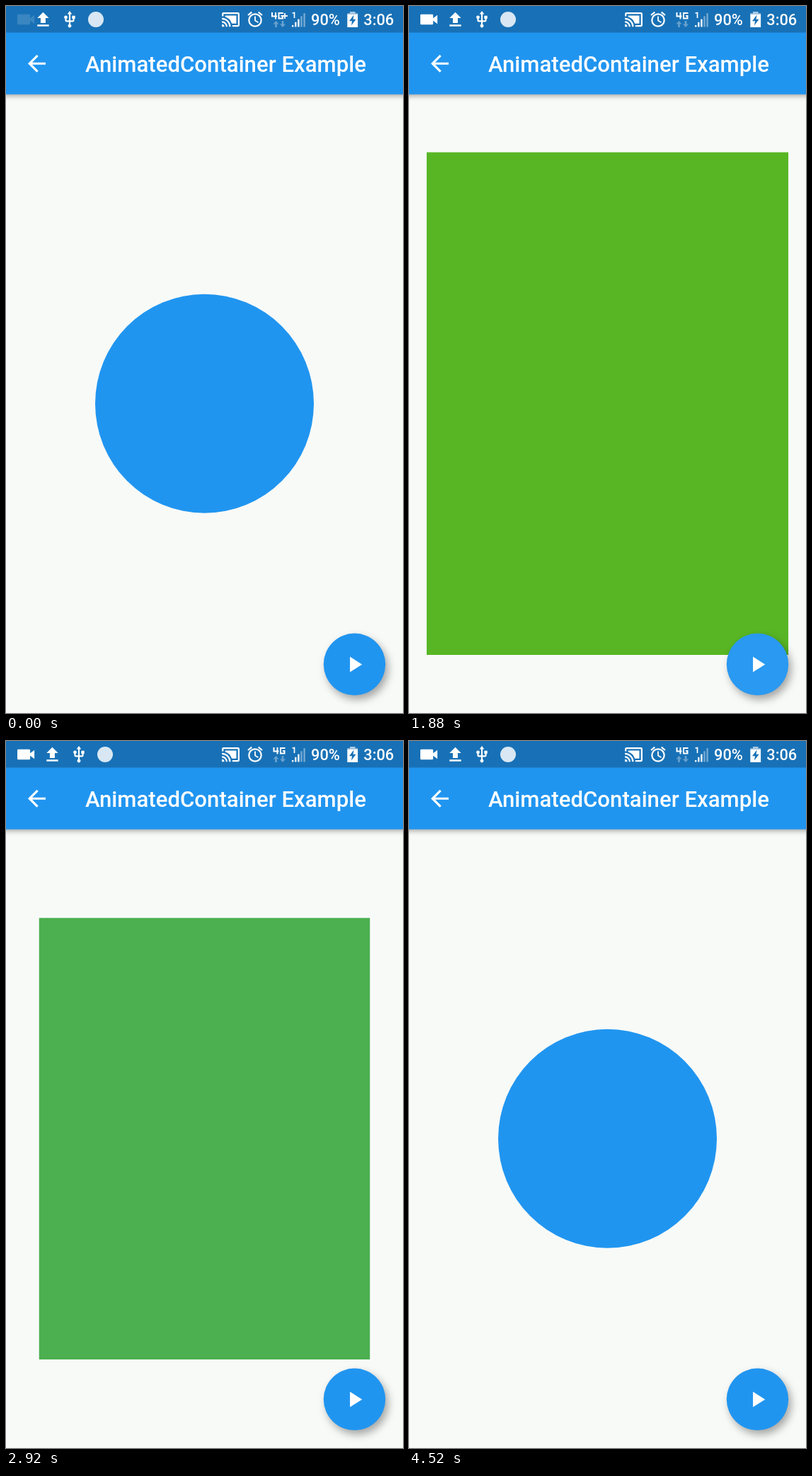
An HTML page with a canvas that plays this animation: 561x998 px, repeating every 4560 ms.

```html
<!DOCTYPE html>
<html lang="en">
<head>
<meta charset="utf-8">
<title>AnimatedContainer Example</title>
<style>
  html, body { margin: 0; width: 100%; height: 100%; overflow: hidden; background: #f8faf8; }
  canvas { display: block; width: 561px; height: 998px; }
</style>
</head>
<body>
<canvas id="stage" width="561" height="998"></canvas>
<script>
const ctx = document.getElementById('stage').getContext('2d');
const LOOP = 4560, STEP = 40, DURATION = 1200;
const TO_RECT = 1670, TO_CIRCLE = 3306;
const BLUE = '#2095f0', WHITE = '#fff';
const circle = { w: 309, h: 309, r: 156, color: [32, 149, 240] };
const rect = { w: 467.5, h: 623.3, r: 0, color: [76, 175, 80] };

// Icon outlines on a 24-unit grid
const icons = {
  back: 'M20 11H7.83l5.59-5.59L12 4l-8 8 8 8 1.41-1.41L7.83 13H20z',
  play: 'M8 5v14l11-7z',
  upload: 'M9 16h6v-6h4l-7-7-7 7h4zM5 18h14v2H5z',
  usb: 'M15 7v4h1v2h-3V5h2l-3-4-3 4h2v8H8v-2.07a2.2 2.2 0 1 0-2 0V13a2 2 0 0 0 2 2h3v3.05a2.2 2.2 0 1 0 2 0V15h3a2 2 0 0 0 2-2v-2h1V7z',
  cast: 'M1 18v3h3a3 3 0 0 0-3-3zM1 14v2a5 5 0 0 1 5 5h2a7 7 0 0 0-7-7zM19 7H5v1.63A13 13 0 0 1 13.37 17H19zM1 10v2a9 9 0 0 1 9 9h2A11 11 0 0 0 1 10zM21 3H3a2 2 0 0 0-2 2v3h2V5h18v14h-7v2h7a2 2 0 0 0 2-2V5a2 2 0 0 0-2-2z',
  camera: 'M3 6H15.5a1 1 0 0 1 1 1v3.5l4.5-3.8v10.6l-4.5-3.8V17a1 1 0 0 1-1 1H4a1 1 0 0 1-1-1V7a1 1 0 0 1 1-1z'
};
for (const name in icons) icons[name] = new Path2D(icons[name]);

const clamp = (x, lo = 0, hi = 1) => Math.min(hi, Math.max(lo, x));
const mix = (a, b, k) => a + (b - a) * k;

function elasticOut(t) {
  if (t <= 0) return 0;
  if (t >= 1) return 1;
  return 1 + 2 ** (-10 * t) * Math.sin((t - 0.1) * Math.PI * 5);
}

function icon(name, x, y, sx, sy = sx) {
  ctx.save();
  ctx.translate(x, y);
  ctx.scale(sx, sy);
  ctx.fillStyle = WHITE;
  ctx.fill(icons[name]);
  ctx.restore();
}

function disc(x, y, r, color) {
  ctx.fillStyle = color;
  ctx.beginPath();
  ctx.arc(x, y, r, 0, Math.PI * 2);
  ctx.fill();
}

function box(x, y, w, h, color) {
  ctx.fillStyle = color;
  ctx.fillRect(x, y, w, h);
}

function poly(points, color) {
  ctx.fillStyle = color;
  ctx.beginPath();
  points.forEach(([x, y]) => ctx.lineTo(x, y));
  ctx.fill();
}

function line(points, width = 2) {
  ctx.strokeStyle = WHITE;
  ctx.lineWidth = width;
  ctx.beginPath();
  points.forEach(([x, y], i) => i ? ctx.lineTo(x, y) : ctx.moveTo(x, y));
  ctx.stroke();
}

function label(text, x, y, size) {
  ctx.font = `500 ${size}px Roboto, sans-serif`;
  ctx.fillStyle = WHITE;
  ctx.fillText(text, x, y);
}

function withShadow(color, blur, dx, dy, draw) {
  ctx.save();
  ctx.shadowColor = color;
  ctx.shadowBlur = blur;
  ctx.shadowOffsetX = dx;
  ctx.shadowOffsetY = dy;
  draw();
  ctx.restore();
}

function drawContainer(t) {
  const back = t >= TO_CIRCLE;
  const [from, to, start] = back ? [rect, circle, TO_CIRCLE] : [circle, rect, TO_RECT];
  const k = elasticOut((t - start) / DURATION);
  const w = mix(from.w, to.w, k), h = mix(from.h, to.h, k);
  const r = clamp(mix(from.r, to.r, k), 0, Math.min(w, h) / 2);
  const rgb = from.color.map((c, i) => Math.round(clamp(mix(c, to.color[i], k), 0, 255)));
  ctx.fillStyle = `rgb(${rgb})`;
  ctx.beginPath();
  ctx.roundRect(280.5 - w / 2, 561.3 - h / 2, w, h, r);
  ctx.fill();
}

function drawNotifications(t) {
  const p = clamp(t / 240);
  const shift = -13 * (1 - p) ** 2;
  ctx.globalAlpha = mix(0.15, 1, p);
  icon('camera', 12, 4.6, 1.34, 1.2);
  ctx.globalAlpha = 1;
  icon('upload', 51.4 + shift, 5.3, 1.17);
  icon('usb', 89.8 + shift, 6, 1.1);
  disc(140 + shift, 19, 11, '#d8e7f3');
}

function drawAlarm() {
  ctx.strokeStyle = WHITE;
  ctx.lineWidth = 2.2;
  ctx.beginPath();
  ctx.arc(352, 20, 8.7, 0, Math.PI * 2);
  ctx.stroke();
  line([[352, 14.5], [352, 20.5], [356.5, 23.2]], 1.8);
  line([[342, 13], [347.3, 8.7]], 2.2);
  line([[362, 13], [356.7, 8.7]], 2.2);
}

function drawNetwork(t) {
  const plus = t < 1000, x = plus ? 375 : 377.5;
  line([[x + 1, 9], [x + 1, 14.5], [x + 8, 14.5]]);
  line([[x + 6, 9], [x + 6, 18.5]]);
  line([[x + 17, 10], [x + 10.5, 10], [x + 10.5, 17.5], [x + 16, 17.5], [x + 16, 14], [x + 13.5, 14]]);
  if (plus) {
    line([[390, 14], [398, 14]], 1.8);
    line([[394, 10], [394, 18]], 1.8);
  }
  ctx.globalAlpha = t >= 1080 && t < 1600 ? 1 : 0.35;
  for (const [cx, dir] of [[381.5, -1], [391, 1]]) {
    const tip = 25.5 + dir * 4.5;
    poly([[cx - 4, tip - dir * 4.5], [cx, tip], [cx + 4, tip - dir * 4.5]], WHITE);
    box(cx - 1.3, 25.5 - (dir > 0 ? 4.5 : 0), 2.6, 4.5, WHITE);
  }
  ctx.globalAlpha = 1;
  line([[404.5, 10], [407.5, 9.5], [407.5, 17]], 1.7);
  for (let i = 0; i < 5; i++) {
    const h = 2.5 + i * 4.2;
    ctx.globalAlpha = i < 3 ? 0.95 : 0.4;
    box(404 + i * 4.1, 29.5 - h, 2.4, h, WHITE);
  }
  ctx.globalAlpha = 1;
}

function drawBattery() {
  box(486, 8, 7.5, 3, '#a9c8e2');
  box(482.3, 10.3, 14.8, 2, '#a9c8e2');
  box(482.3, 12, 14.8, 18, WHITE);
  poly([[491.5, 12.5], [485, 21.3], [489, 21.3], [488, 27.5], [494.5, 18.7], [490.5, 18.7]], '#1871b6');
}

function drawBars(t) {
  withShadow('rgba(0,0,0,.35)', 7, 0, 2, () => box(-20, 0, 601, 124.7, BLUE));
  box(0, 0, 561, 37.5, '#1871b6');
  drawNotifications(t);
  icon('cast', 304, 5.5, 1.13);
  drawAlarm();
  drawNetwork(t);
  label('90%', 431, 27.3, 21.8);
  drawBattery();
  label('3:06', 505.3, 27.3, 21.8);
  icon('back', 24.8, 62.6, 1.558);
  label('AnimatedContainer Example', 112, 92.7, 31.17);
}

function drawButton(t) {
  const x = 492.5, y = 929.3, r = 43.7;
  withShadow('rgba(0,0,0,.34)', 12, 4, 6, () => disc(x, y, r, BLUE));
  for (const start of [TO_RECT, TO_CIRCLE]) {
    const p = (t - start + 70) / 320;
    if (p <= 0 || p >= 1) continue;
    const glow = 0.13 * Math.min(1, p * 5, (1 - p) * 2.5);
    disc(x, y, r * clamp(0.4 + p * 1.6), `rgba(255,255,255,${glow})`);
  }
  icon('play', 473.6, 910.7, 1.558);
}

function frame(now) {
  const t = Math.floor((now % LOOP) / STEP) * STEP;
  box(0, 0, 561, 998, '#f8faf8');
  drawContainer(t);
  drawBars(t);
  drawButton(t);
  requestAnimationFrame(frame);
}

let origin;
requestAnimationFrame(function begin(now) {
  frame(now);
});
</script>
</body>
</html>
```
